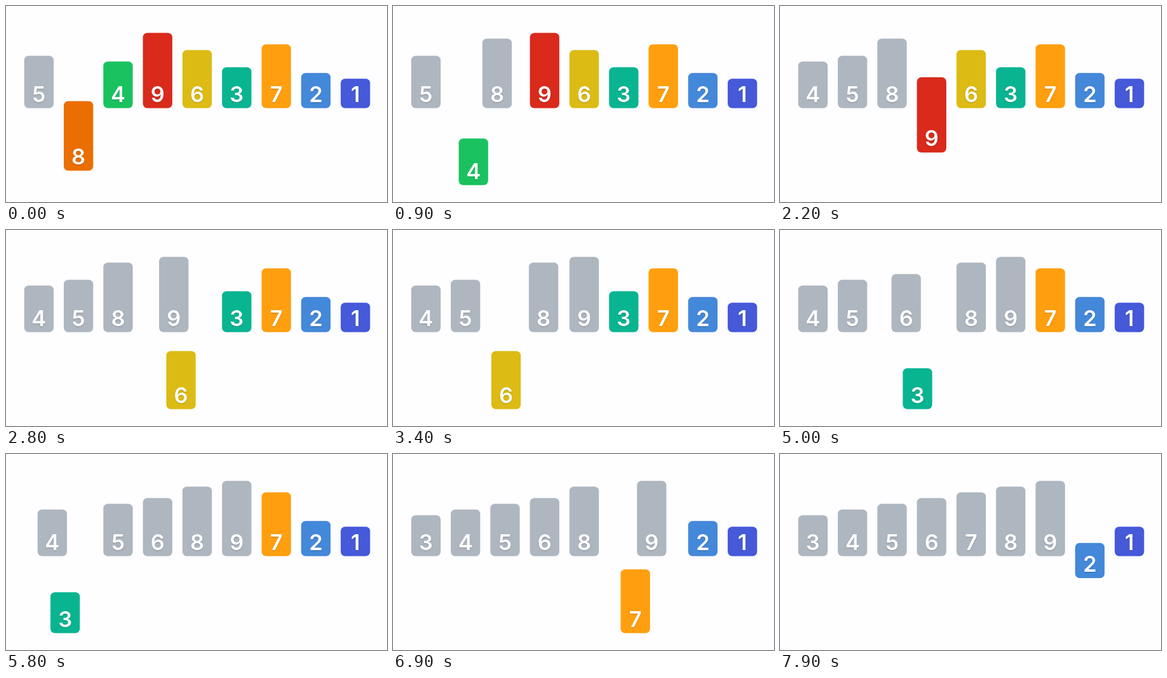
These frames come from a looping animation (600 px wide and 308 px high, 8000 ms). An HTML page:

```html
<!DOCTYPE html>
<html lang="en">
<head>
<meta charset="utf-8">
<title>Insertion sort</title>
<style>
  html, body { margin: 0; width: 100%; height: 100%; overflow: hidden; background: #fefdff; }
  svg { display: block; width: 600px; height: 308px; }
  text {
    font: 600 34.5px Inter, "Open Sans", sans-serif;
    fill: #fff;
    text-anchor: middle;
    text-shadow: 0 1px 2px rgba(0, 0, 0, .2);
  }
</style>
</head>
<body>
<svg id="stage" viewBox="0 0 600 308"></svg>
<script>
const LOOP = 8000, LEAD = 196, STRETCH = 1.0053;   // the clip starts mid-move and runs slightly slow
const MOVE = 300, SHIFT_STEP = 400;
const LEFT = 28.7, PITCH = 62.3, WIDTH = 46.3, FLOOR = 160.5, DROP = 121;
const GRAY = '#aeb6bf';
const COLORS = ['', '#4559d9', '#4488d9', '#09b491', '#19c25f', GRAY,
                '#dcbb14', '#ff9f0f', '#eb6e00', '#d92a1c'];
const START = [5, 8, 4, 9, 6, 3, 7, 2, 1];

const stage = document.getElementById('stage');

function add(parent, tag, attrs) {
  const el = document.createElementNS('http://www.w3.org/2000/svg', tag);
  for (const name in attrs) el.setAttribute(name, attrs[name]);
  return parent.appendChild(el);
}

const bars = START.map((value, slot) => {
  const group = add(stage, 'g');
  const height = 37.3 + 9 * value;
  const rect = add(group, 'rect', { y: -height, width: WIDTH, height, rx: 7 });
  add(group, 'text', { x: WIDTH / 2, y: -10 }).textContent = value;
  return { value, slot, group, rect, sortedAt: Infinity };
});

// Run the sort once and record every move with its start time.
const moves = [];
const order = bars.slice();
let clock = 0;

function move(bar, axis, from, to) {
  moves.push({ bar, axis, from, to, start: clock });
}

for (let i = 1; i < order.length; i++) {
  const key = order[i];
  move(key, 'y', 0, DROP);
  clock += MOVE;
  let j = i;
  for (; j > 0 && order[j - 1].value > key.value; j--) {
    order[j] = order[j - 1];
    move(order[j], 'x', j - 1, j);
    move(key, 'x', j, j - 1);
    clock += SHIFT_STEP;
  }
  order[j] = key;
  move(key, 'y', DROP, 0);
  clock += MOVE;
  key.sortedAt = clock;
}

const ease = t => t + 0.7 * t * (1 - t);

function draw() {
  const time = (performance.now() % LOOP + LEAD) / STRETCH;
  for (const bar of bars) {
    bar.x = bar.slot;
    bar.y = 0;
  }
  for (const { bar, axis, from, to, start } of moves) {
    if (start > time) break;
    bar[axis] = from + (to - from) * ease(Math.min(1, (time - start) / MOVE));
  }
  for (const bar of bars) {
    bar.group.setAttribute('transform', `translate(${LEFT + PITCH * bar.x} ${FLOOR + bar.y})`);
    bar.rect.setAttribute('fill', time >= bar.sortedAt ? GRAY : COLORS[bar.value]);
  }
  requestAnimationFrame(draw);
}
draw();
</script>
</body>
</html>
```
